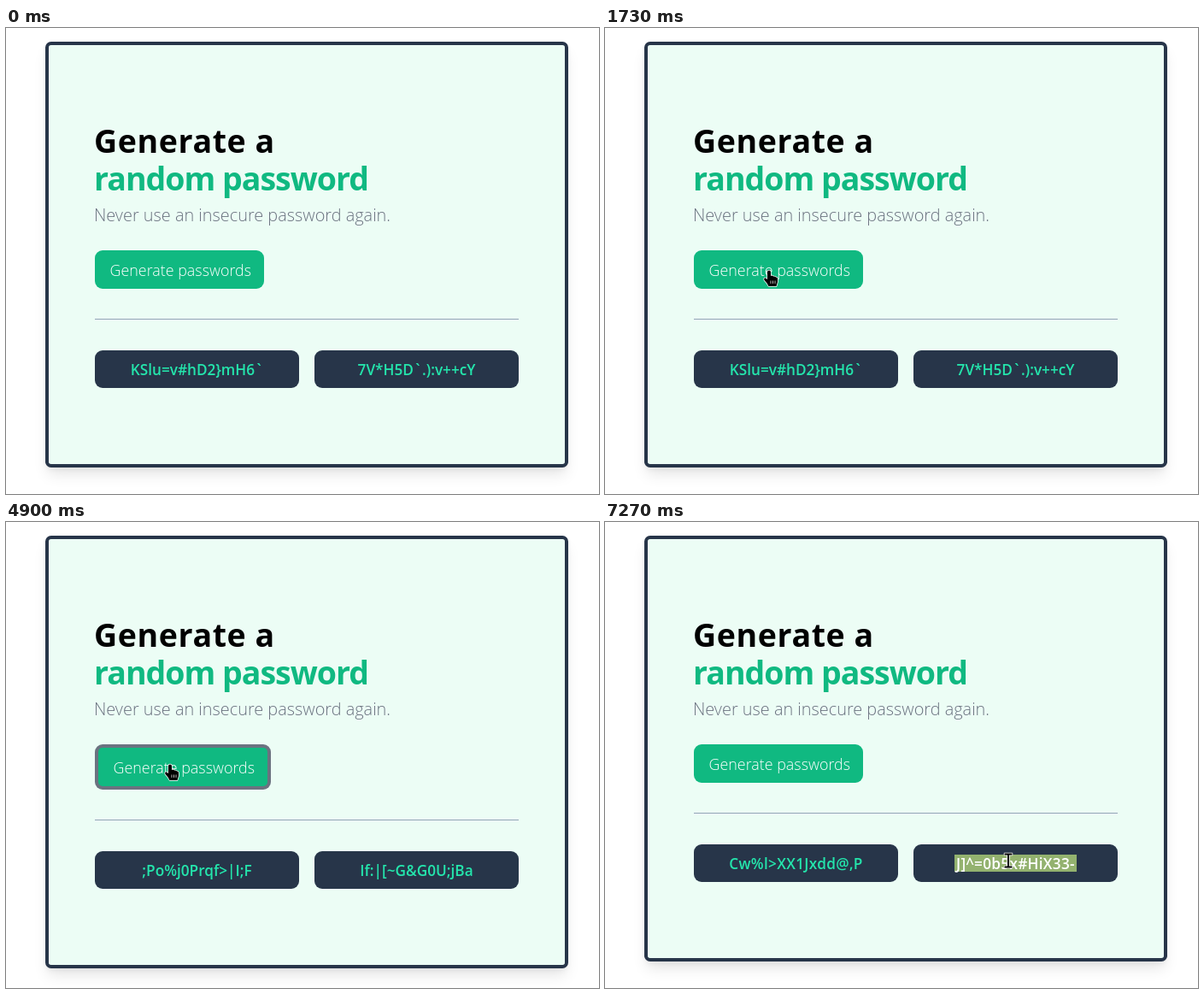
An HTML page that plays this animation: 694 by 545 pixels, repeating every 8 s.

```html
<!DOCTYPE html>
<html lang="en">
<head>
<meta charset="utf-8">
<title>Password generator</title>
<style>
html, body { margin: 0; width: 100%; height: 100%; overflow: hidden; background: #fff; }
.card {
  position: absolute; left: 46px; top: 16px; width: 612px; height: 498px;
  box-sizing: border-box; border: 4px solid #273549; border-radius: 6.75px; background: #ecfdf5;
  box-shadow: 0 11px 17px -3px rgba(0,0,0,.1), 0 4.5px 7px -2px rgba(0,0,0,.05);
}
svg { position: absolute; left: 0; top: 0; }
text { font-family: "Open Sans", "Noto Sans", sans-serif; white-space: pre; }
.title { font-family: "Noto Sans", "Open Sans", sans-serif; font-size: 37.5px; font-weight: 700; letter-spacing: .6px; }
.accent { fill: #10b981; letter-spacing: -1px; }
.lead { font-size: 19.9px; font-weight: 300; fill: #6b7280; }
.label { font-size: 17.9px; font-weight: 300; fill: #fff; }
.pass { font-size: 17.2px; font-weight: 600; fill: #24e5ac; text-anchor: middle; }
.wide .pass { letter-spacing: .3px; }
rect.round { rx: 9px; }
.box { fill: #273549; }
.ring { fill: #6b7280; visibility: hidden; }
.pressed .card { height: 506px; }
.pressed .ring { visibility: visible; }
.pressed .face { transform: translate(4px, 4px); }
.pressed .face rect { rx: 5px; }
.pressed .below { transform: translateY(8px); }
.cursor > * { stroke: #fff; stroke-width: 1.5; stroke-linejoin: round; paint-order: stroke; }
</style>
</head>
<body>
<div class="card"></div>
<svg width="694" height="545" viewBox="0 0 694 545">
  <text class="title" x="103" y="146">Generate a</text>
  <text class="title accent" x="103" y="190">random password</text>
  <text class="lead" x="103" y="225.5">Never use an insecure password again.</text>
  <rect class="round ring" x="104" y="260" width="206" height="53"/>
  <g class="face">
    <rect class="round" x="104" y="260" width="198" height="45" fill="#10b981"/>
    <text class="label" x="121.5" y="289.5">Generate passwords</text>
  </g>
  <g class="below">
    <rect x="104" y="340" width="496" height="1" fill="#94a3b8"/>
    <rect class="round box" x="104" y="377" width="239" height="44"/>
    <rect class="round box" x="361" y="377" width="239" height="44"/>
    <rect id="mark" y="389" height="20" fill="#93b26f"/>
    <text class="pass" id="left" x="223.5" y="405.5"></text>
    <text class="pass" id="right" x="480.5" y="405.5"></text>
  </g>
  <g class="cursor" id="cursor">
    <path id="arrow" d="M0 0V14.5L3.4 11.4 5.6 16 8.2 14.8 6 10.6H11.4Z"/>
    <g id="hand">
      <path d="M-2 0.5Q-2-1.5 0-1.5T2 0.5V5Q4 4 5 5.6 7 5 8 6.6 10 6.3 10 8.5V12L8.5 17H-.5L-2.5 13.5-5.5 10Q-6.5 7.5-4.4 7.3L-2 9Z"/>
      <path d="M2 10.5V14M4.5 10.5V14M7 10.5V14" stroke-width=".7"/>
    </g>
    <path id="beam" d="M-4.5-8.5H4.5V-6.5H1V6.5H4.5V8.5H-4.5V6.5H-1V-6.5H-4.5Z"/>
  </g>
</svg>
<script>
const LOOP = 8000;
const $ = id => document.getElementById(id);

// Pointer path: time, x, y
const path = [
  [770, -4, 300], [1230, 98, 281], [1570, 187, 284], [1730, 192, 285],
  [5500, 192, 285], [5670, 260, 315], [6000, 385, 367], [6300, 468, 394], [6470, 472, 396]
];
const presses = [[2400, 2530], [4900, 4970]];
const passwords = [
  ["KSlu=v#hD2}mH6`", "7V*H5D`.):v++cY"],
  [";Po%j0Prqf>|I;F", "If:|[~G&G0U;jBa"],
  ["Cw%l>XX1Jxdd@,P", "J]^=0b5x#HiX33-"]
];

function pointerAt(t) {
  const i = path.findIndex(key => key[0] > t);
  if (i < 0) return path[path.length - 1].slice(1);
  const [t0, x0, y0] = path[i - 1], [t1, x1, y1] = path[i];
  const p = (t - t0) / (t1 - t0);
  return [x0 + (x1 - x0) * p, y0 + (y1 - y0) * p];
}

function show(id, on) {
  $(id).style.display = on ? "" : "none";
}

function drawPointer(t) {
  const visible = t >= path[0][0];
  show("cursor", visible);
  if (!visible) return;
  const [x, y] = pointerAt(t);
  const onButton = x >= 104 && x <= 302 && y >= 260 && y <= 305;
  const onText = x >= 409 && x <= 552 && y >= 389 && y <= 409;
  show("hand", onButton);
  show("beam", onText);
  show("arrow", !onButton && !onText);
  $("cursor").setAttribute("transform", `translate(${x} ${y})`);
}

// Double click marks a word, triple click the whole line
function drawSelection(t) {
  const all = t >= 7270;
  show("mark", t >= 7100);
  $("mark").setAttribute("x", all ? 409 : 445);
  $("mark").setAttribute("width", all ? 143 : 40);
  $("right").style.fill = all ? "#fff" : "";
  if (t >= 7100 && !all) {
    $("right").innerHTML = 'J]^=<tspan fill="#fff">0b5x</tspan>#HiX33-';
  }
}

function draw(now) {
  const t = now % LOOP;
  const round = presses.filter(press => t >= press[1]).length;
  const pressed = presses.some(([down, up]) => t >= down && t < up);
  document.body.className = (pressed ? "pressed " : "") + (round === 2 ? "wide" : "");
  [$("left").textContent, $("right").textContent] = passwords[round];
  drawSelection(t);
  drawPointer(t);
}

const start = performance.now();
function frame() {
  draw(performance.now() - start);
  requestAnimationFrame(frame);
}
frame();
</script>
</body>
</html>
```
